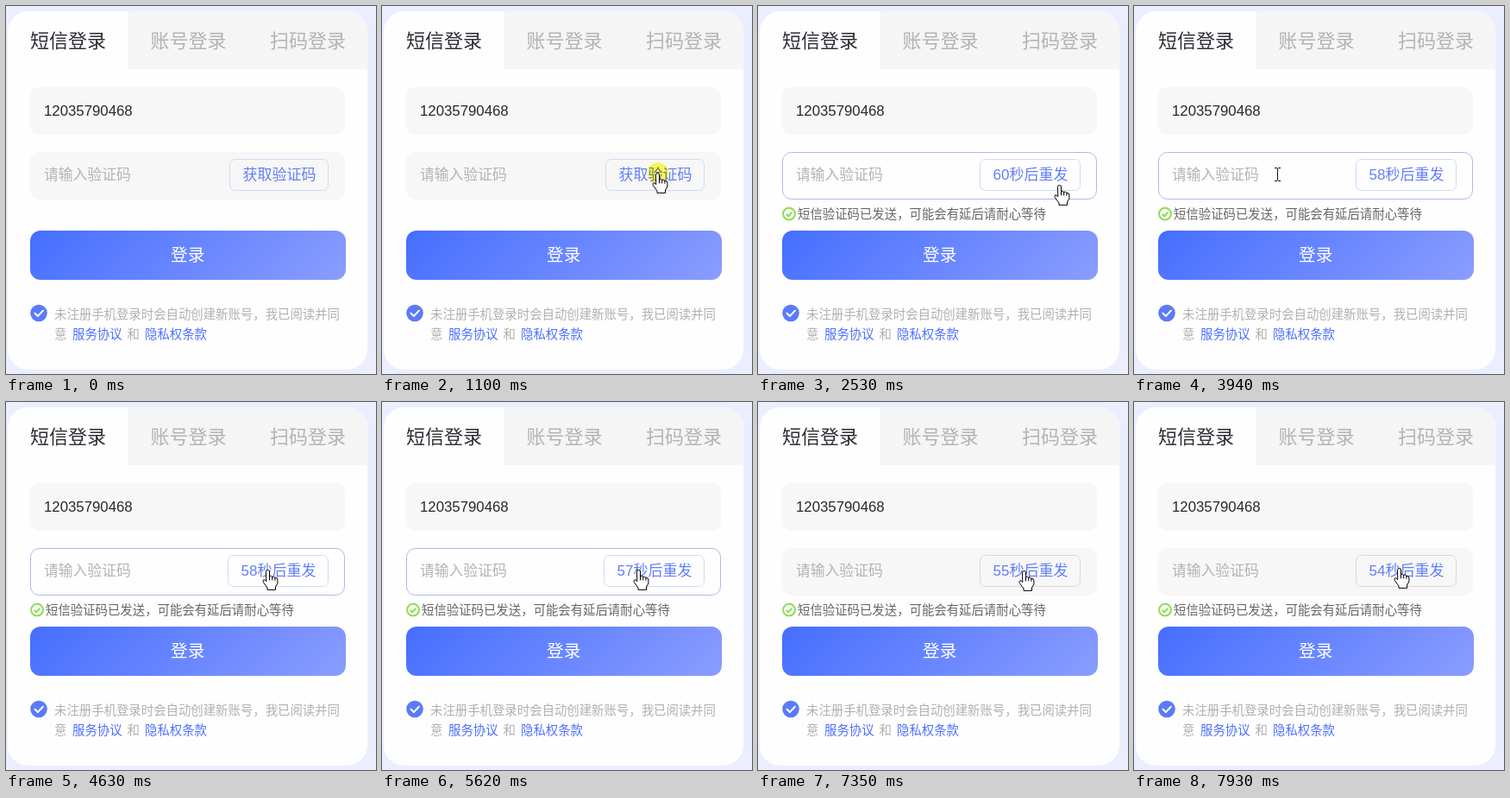
An HTML page that plays this animation: 429x426 px, repeating every 8000 ms.

```html
<!DOCTYPE html>
<html lang="zh-CN">
<head>
<meta charset="utf-8">
<title>短信登录</title>
<style>
html, body { margin: 0; width: 100%; height: 100%; overflow: hidden; background: #ebeefe; }
svg { display: block; font: 16.8px "Liberation Sans", "Noto Sans CJK SC", "Noto Sans CJK", sans-serif; }
.tab { font-size: 22px; fill: #b3b3b6; }
.small { font-size: 14.4px; fill: #b0b0b0; }
.link { fill: #4d70ff; }
.mid { text-anchor: middle; }
.pointer { fill: #fff; stroke: #000; stroke-linejoin: round; stroke-linecap: round; }
#spot { mix-blend-mode: multiply; }
</style>
</head>
<body>
<svg width="429" height="426" viewBox="0 0 429 426">
  <defs>
    <linearGradient id="blue" gradientUnits="userSpaceOnUse" x1="105" y1="182" x2="317" y2="395">
      <stop offset="0" stop-color="#456eff"/>
      <stop offset="1" stop-color="#8b9dff"/>
    </linearGradient>
    <clipPath id="card"><rect x="2" y="6" width="417" height="415" rx="24"/></clipPath>
  </defs>
  <g clip-path="url(#card)">
    <rect x="2" y="6" width="417" height="415" fill="#fefefe"/>
    <rect x="141" y="6" width="278" height="67" fill="#f5f5f5"/>
  </g>
  <text class="tab" x="28" y="48.3" style="fill:#2b2d33">短信登录</text>
  <text class="tab" x="167.5" y="48.3">账号登录</text>
  <text class="tab" x="306" y="48.3">扫码登录</text>

  <rect x="28" y="94" width="365" height="55" rx="10" fill="#f7f7f7"/>
  <text x="44" y="127" fill="#26282c">12035790468</text>

  <rect id="field" x="28.5" y="169.5" width="364" height="54" rx="10"/>
  <text x="44" y="201" fill="#b3b3b3">请输入验证码</text>
  <rect id="caret" x="44" y="187" width="1" height="19" fill="#222"/>
  <rect id="send" y="177.5" height="36" rx="6" fill="none"/>
  <text id="label" class="mid" y="201" fill="#627ef8" font-size="17"></text>

  <g id="sent">
    <circle cx="36" cy="240.7" r="6.9" fill="#fff" stroke="#8fdc57" stroke-width="2"/>
    <path d="M32.6 240.8l2.6 2.6 4.4-4.7" fill="none" stroke="#8fdc57" stroke-width="2"/>
    <text class="small" x="46" y="246" style="fill:#666">短信验证码已发送，可能会有延后请耐心等待</text>
  </g>

  <rect x="28" y="260" width="366" height="57" rx="12" fill="url(#blue)"/>
  <text class="mid" x="210.7" y="295" fill="#fff" font-size="19.6">登录</text>

  <circle cx="38" cy="355.5" r="9.8" fill="#5b7afa"/>
  <path d="M33.5 355.6l3.4 3.4 6-6.4" fill="none" stroke="#fff" stroke-width="2" stroke-linecap="round" stroke-linejoin="round"/>
  <g class="small">
    <text x="56" y="362">未注册手机登录时会自动创建新账号，我已阅读并同</text>
    <text x="56" y="385">意</text>
    <text x="77" y="385" class="link">服务协议</text>
    <text x="140.5" y="385">和</text>
    <text x="161" y="385" class="link">隐私权条款</text>
  </g>

  <g id="cursor">
    <circle id="spot" r="12" fill="#fff800" opacity=".6"/>
    <g id="hand" class="pointer" transform="translate(-.5 0)">
      <path d="M-2 2Q-1.8.5 0 .5T2 2V7.6Q4.2 6.6 5.2 8.4Q7.4 7.4 8.4 9.4Q11.4 9 11.4 12V16L9 20V23.4H-.5V21L-5.2 14.6Q-6.2 11.2-3.4 11.9L-2 13.4Z"/>
      <path d="M2 7.6V12M5.2 8.4V12M8.4 9.4V12.4" fill="none"/>
    </g>
    <path id="arrow" class="pointer" d="M.5.5V16.5L4.2 13L6.8 18.8L9.2 17.8L6.7 12.2H11.7Z"/>
    <path id="beam" d="M-3-7.5H0M1-7.5H4M.5-7V7M-3 7.5H0M1 7.5H4" fill="none" stroke="#111"/>
  </g>
</svg>
<script>
const LOOP = 8000, STEP = 78;
const START = 70, SENT = 1860, BLUR = 6490;
const SECOND = 990, BLINK = 515, PRESS = 160;
const CLICKS = [1090, BLUR, 7760];
const ENTRY = [389, 396];

// Each move ends at a resting point: begin, end, x, y
const MOVES = [
  [START, 560, 320, 193],
  [1640, 2030, 407, 165],
  [2030, 2530, 350, 207],
  [2600, 3230, 166, 195],
  [3940, 4240, 330, 204],
  [4240, 4630, 304, 194],
  [5390, 5620, 298, 194],
  [5850, 6260, 311, 199],
  [7270, 7500, 308, 192]
];

const $ = id => document.getElementById(id);
const show = (id, on) => $(id).setAttribute('visibility', on ? 'inherit' : 'hidden');
const set = (id, attrs) => { for (const k in attrs) $(id).setAttribute(k, attrs[k]); };
const inside = (x, y, l, top, r, b) => x >= l && x <= r && y >= top && y <= b;
const ease = u => u * (2 - u);

// The cursor advances in whole steps, like a screen recording.
function cursorAt(t) {
  let [x, y] = ENTRY;
  for (const [begin, end, toX, toY] of MOVES) {
    if (t < begin) break;
    const u = t >= end ? 1 : ease(Math.floor((t - begin) / STEP) * STEP / (end - begin));
    x += (toX - x) * u;
    y += (toY - y) * u;
  }
  return [Math.round(x), Math.round(y)];
}

function shapeAt(x, y) {
  if (inside(x, y, 257, 177, 374, 214) || inside(x, y, 28, 260, 394, 317)) return 'hand';
  return inside(x, y, 28, 169, 393, 224) ? 'beam' : 'arrow';
}

function render(t) {
  const sent = t >= SENT, focus = sent && t < BLUR;
  set('field', focus ? { fill: '#fefefe', stroke: '#b2b6ee' } : { fill: '#f7f7f7', stroke: '#f7f7f7' });
  show('caret', focus && Math.floor((t - SENT - STEP) / BLINK) % 2 === 0);
  show('sent', sent);

  const left = sent ? 257.5 : 259.5;
  set('send', { x: left, width: 373.5 - left, stroke: t >= BLUR ? '#d9d9de' : '#d3d9f6' });
  set('label', { x: (left + 374.5) / 2 });
  $('label').textContent = sent ? 60 - Math.floor((t - SENT) / SECOND) + '秒后重发' : '获取验证码';

  const [x, y] = cursorAt(t), shape = shapeAt(x, y);
  set('cursor', { transform: `translate(${x} ${y})` });
  for (const id of ['hand', 'arrow', 'beam']) show(id, id === shape && t >= START);
  show('spot', CLICKS.some(at => t >= at && t < at + PRESS));
}

const begin = performance.now();
function frame() {
  render((performance.now() - begin) % LOOP);
  requestAnimationFrame(frame);
}
frame();
</script>
</body>
</html>
```
